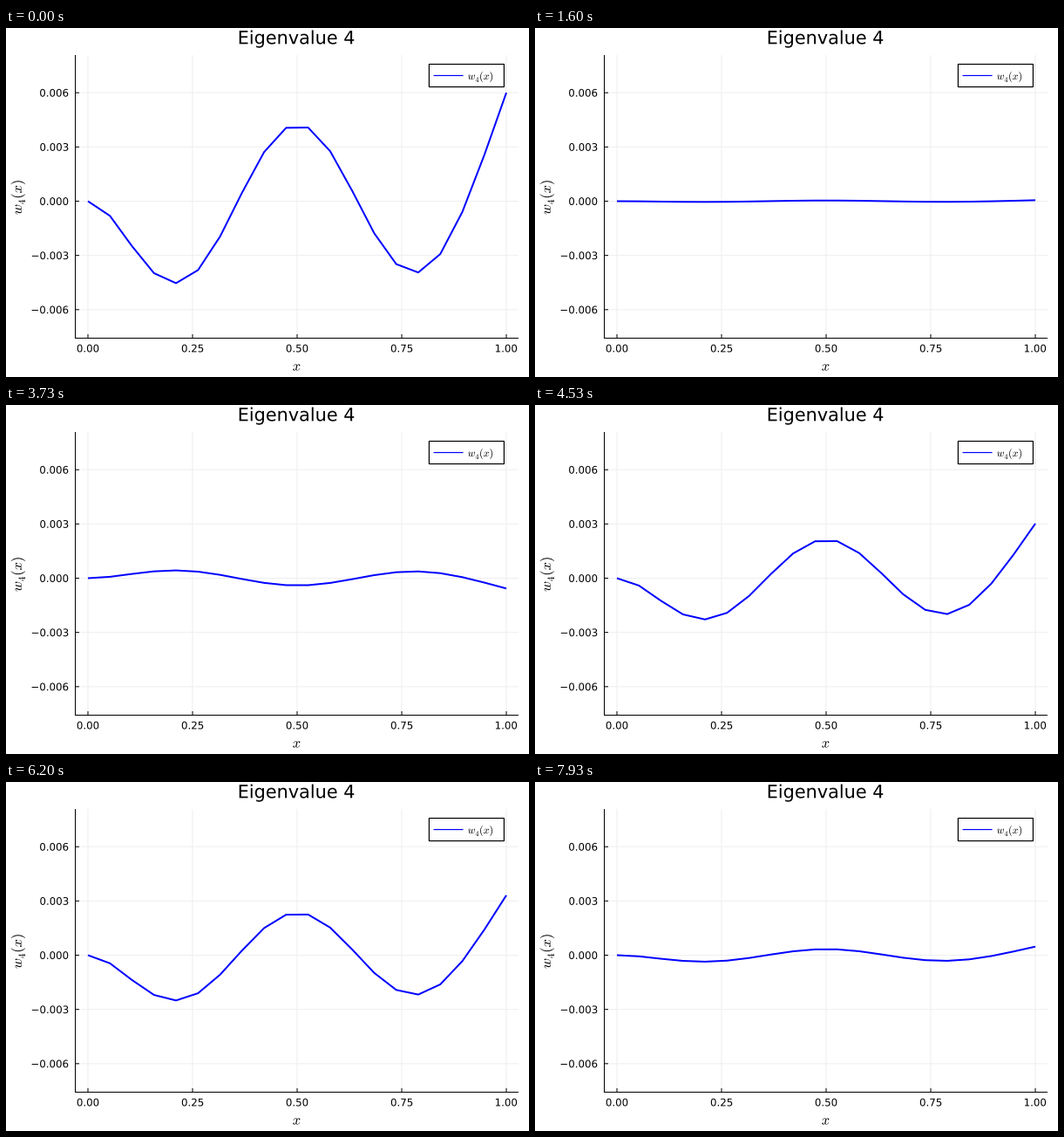
A matplotlib script for the animation above (8 s loop, 600x400 px).

```python
import numpy as np
import matplotlib.pyplot as plt
from matplotlib.animation import FuncAnimation
from matplotlib.patches import PathPatch, Rectangle
from matplotlib.path import Path
from matplotlib.textpath import TextPath
from matplotlib.transforms import Affine2D

plt.rcParams["font.family"] = "DejaVu Sans"
plt.rcParams["mathtext.fontset"] = "cm"

FRAMES = 120
LOOP_MS = 8000
X0, X_SPAN = 94, 480          # x = 0 and the width of the unit interval, in pixels
Y0, Y_UNIT = 198.5, 20720     # y = 0 and pixels per data unit
LEFT, RIGHT, TOP, BOTTOM = 79.5, 588, 31, 355.5
BETA = 10.995541              # fourth clamped-free beam root
TICK, TITLE, AXIS, LEGEND = 11.8, 20.8, 16.4, 12   # text sizes in pixels


def px(size):
    """Pixels to points at 100 dpi."""
    return size * 0.72


def mode(x):
    """Fourth cantilever mode with its free end at 0.006."""
    s = (np.cosh(BETA) + np.cos(BETA)) / (np.sinh(BETA) + np.sin(BETA))
    z = BETA * x
    phi = np.cosh(z) - np.cos(z) - s * (np.sinh(z) - np.sin(z))
    return 0.006 * phi / phi[-1]


# Turning points of the swing: (step, amplitude)
KEYS = np.array([
    (0, 1.0), (13, 0.374), (19, -0.06), (24, 0.009), (33, 0.6), (39, 0.197),
    (47, -0.302), (55, -0.095), (65, 0.35), (70, 0.675), (78, 0.24),
    (81, 0.063), (85, -0.03), (91, 0.43), (101, 0.886), (103, 0.868),
    (115, 0.02), (118, 0.079), (119, 0.079),
])


def swing(k):
    """Monotone cubic through the keys."""
    t, a = KEYS.T
    h = np.diff(t)
    d = np.diff(a) / h
    m = np.zeros(len(t))
    same = d[:-1] * d[1:] > 0
    w1, w2 = 2 * h[1:] + h[:-1], h[1:] + 2 * h[:-1]
    m[1:-1][same] = ((w1 + w2)[same]
                     / (w1[same] / d[:-1][same] + w2[same] / d[1:][same]))
    i = min(np.searchsorted(t, k, side="right") - 1, len(h) - 1)
    u = (k - t[i]) / h[i]
    return (a[i] * (1 + 2 * u) * (1 - u) ** 2
            + a[i + 1] * u * u * (3 - 2 * u)
            + h[i] * u * (1 - u) * (m[i] * (1 - u) - m[i + 1] * u))


fig = plt.figure(figsize=(6, 4), dpi=100, facecolor="white")
ax = fig.add_axes([0, 0, 1, 1])
ax.set(xlim=(0, 600), ylim=(400, 0))
ax.axis("off")


def segment(x1, y1, x2, y2, color="black", width=1.0, z=2):
    ax.plot([x1, x2], [y1, y2], color=color, lw=px(width), zorder=z,
            solid_capstyle="butt", snap=False)


def label(x, y, path, anchor=0.5, angle=0):
    """Filled outlines; anchor is the share of the ink width left of x."""
    box = path.get_extents()
    place = (Affine2D().translate(-box.x0 - anchor * box.width, 0)
             .scale(1, -1).rotate_deg(-angle).translate(x, y))
    ax.add_patch(PathPatch(place.transform_path(path), fc="black", lw=0,
                           zorder=6, snap=False))


def words(text, size):
    return TextPath((0, 0), text, size=size)


def w4_of_x(size):
    """w(x) with a low-set subscript 4."""
    return Path.make_compound_path(
        words("$w$", size),
        TextPath((0.72 * size, -0.24 * size), "$4$", size=0.7 * size),
        TextPath((1.11 * size, 0), "$(x)$", size=size))


GRID = "#efefef"
for v in np.linspace(0, 1, 5):
    x = X0 + X_SPAN * v
    segment(x, TOP, x, BOTTOM, GRID, z=1)
    segment(x, BOTTOM, x, BOTTOM - 4.5)
    label(x, 371.4, words(f"{v:.2f}", TICK))
for v in (-0.006, -0.003, 0, 0.003, 0.006):
    y = Y0 - Y_UNIT * v
    segment(LEFT, y, RIGHT, y, GRID, z=1)
    segment(LEFT, y, LEFT + 4.5, y)
    label(71.3, y + 4.4, words(f"{v:.3f}".replace("-", "\u2212"), TICK), 1)

segment(LEFT, TOP, LEFT, BOTTOM + 0.5)
segment(LEFT - 0.5, BOTTOM, RIGHT, BOTTOM)

label(333.5, 18.3, words("Eigenvalue 4", TITLE))
label(333.3, 392.6, words("$x$", AXIS))
label(18, 194.4, w4_of_x(AXIS), angle=90)

ax.add_patch(Rectangle((485.4, 41.5), 86, 26, fc="white", ec="black",
                       lw=px(1.2), zorder=4, snap=False))
segment(490.5, 54.5, 524.5, 54.5, "blue", 1.2, z=5)
label(530, 59, w4_of_x(LEGEND), 0)

xs = np.linspace(0, 1, 20)
shape = mode(xs)
curve, = ax.plot(X0 + X_SPAN * xs, np.full(20, Y0), color="blue", lw=px(2),
                 solid_capstyle="butt", solid_joinstyle="round", zorder=3)


def draw(k):
    curve.set_ydata(Y0 - Y_UNIT * shape * swing(k))
    return curve,


anim = FuncAnimation(fig, draw, frames=FRAMES, interval=LOOP_MS / FRAMES,
                     init_func=lambda: draw(0), repeat=True, repeat_delay=0)
plt.show()
```
